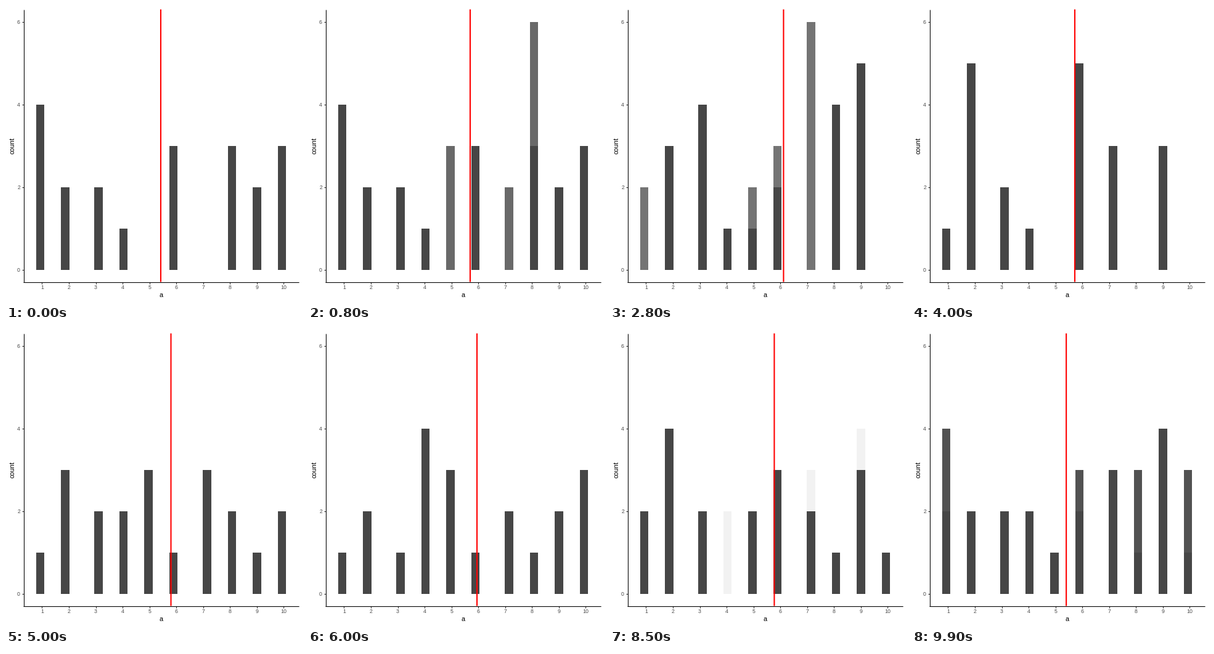
These frames come from a looping animation (480x480 px, 10000 ms). A matplotlib script:

```python
import math

import matplotlib.pyplot as plt
from matplotlib.animation import FuncAnimation
from matplotlib.patches import Rectangle

SIZE, DPI = 480, 80
PT = 72 / DPI  # points per pixel
STEPS = 10     # drawings per sample
BAR, RED, TICK, LABEL = "#464646", "#ff0000", "#333333", "#4d4d4d"
LEFT, RIGHT, TOP, BASE = 28.5, 474.5, 5.5, 447.5
UNIT_X, UNIT_Y, ZERO = 43.55, 67, 428
BIN = 9 / 29

# Counts of the values 1 to 10 in each sample of 20
SAMPLES = [
    (4, 2, 2, 1, 0, 3, 0, 3, 2, 3),
    (0, 2, 2, 1, 3, 2, 2, 6, 1, 1),
    (0, 3, 4, 1, 1, 2, 0, 4, 5, 0),
    (2, 1, 1, 1, 2, 3, 6, 2, 2, 0),
    (1, 5, 2, 1, 0, 5, 3, 0, 3, 0),
    (1, 3, 2, 2, 3, 1, 3, 2, 1, 2),
    (1, 2, 1, 4, 3, 1, 2, 1, 2, 3),
    (3, 2, 2, 2, 1, 2, 2, 2, 2, 2),
    (2, 4, 2, 0, 2, 3, 2, 1, 3, 1),
    (2, 2, 2, 2, 1, 2, 3, 1, 4, 1),
]
MEANS = [5.42, 5.76, 5.76, 6.24, 5.72, 5.8, 5.95, 5.83, 5.82, 5.15]


def to_x(value):
    return 58.45 + (value - 1) * UNIT_X


fig = plt.figure(figsize=(SIZE / DPI, SIZE / DPI), dpi=DPI, facecolor="white")
ax = fig.add_axes([0, 0, 1, 1])
ax.set(xlim=(0, SIZE), ylim=(SIZE, 0))
ax.axis("off")


def stroke(xs, ys, color, width=1.07, **style):
    return ax.plot(xs, ys, color=color, lw=width * PT,
                   solid_capstyle="butt", **style)[0]


def text(x, y, label, size, color, ha="center", **style):
    ax.text(x, y, label, fontsize=size * PT, color=color, ha=ha,
            family="Liberation Sans", **style)


def make_bars(zorder):
    bars = []
    for value in range(1, 11):
        center = round(value / BIN) * BIN
        x0, x1 = (round(to_x(center + side * BIN / 2)) for side in (-1, 1))
        bar = Rectangle((x0, ZERO), x1 - x0, 0, fc=BAR, lw=0,
                        antialiased=False, zorder=zorder)
        bars.append(ax.add_patch(bar))
    return bars


def set_bars(bars, counts, alpha=1):
    for bar, count in zip(bars, counts):
        bar.set_y(ZERO - UNIT_Y * count)
        bar.set_height(UNIT_Y * count)
        bar.set_alpha(alpha)


for value in range(1, 11):
    x = to_x(value)
    stroke([x, x], [BASE, BASE + 3], TICK)
    text(x, 459, str(value), 8.8, LABEL, va="baseline")
for count in (0, 2, 4, 6):
    y = ZERO - UNIT_Y * count
    stroke([LEFT - 3, LEFT], [y, y], TICK)
    text(23, y + 3, str(count), 8.8, LABEL, ha="right", va="baseline")
stroke([LEFT, LEFT], [TOP, BASE + 0.5], "black", zorder=5)
stroke([LEFT - 0.5, RIGHT], [BASE, BASE], "black", zorder=5)
text(251.3, 472, "a", 11, "black", va="baseline")
text(10, 227, "count", 11, "black", va="center", rotation=90)

old_bars, new_bars = make_bars(2), make_bars(3)
mean_line = stroke([0, 0], [TOP, BASE], RED, 2.1, zorder=4, snap=False)


def progress(state, step):
    """Eased share of the change to the next sample."""
    hold = 3 if state == 0 else 4
    p = max(0, step - hold) / (STEPS - hold)
    return (1 - math.cos(math.pi * p)) / 2


def draw(frame):
    state, step = divmod(frame, STEPS)
    after = (state + 1) % len(SAMPLES)
    share = progress(state, step)
    # The old bars stay solid while the new ones fade in over them
    set_bars(old_bars, SAMPLES[state])
    set_bars(new_bars, SAMPLES[after], share)
    x = to_x(MEANS[state] + share * (MEANS[after] - MEANS[state]))
    mean_line.set_xdata([x, x])
    return [*old_bars, *new_bars, mean_line]


anim = FuncAnimation(fig, draw, frames=STEPS * len(SAMPLES), interval=100,
                     repeat=True, repeat_delay=0)
plt.show()
```
